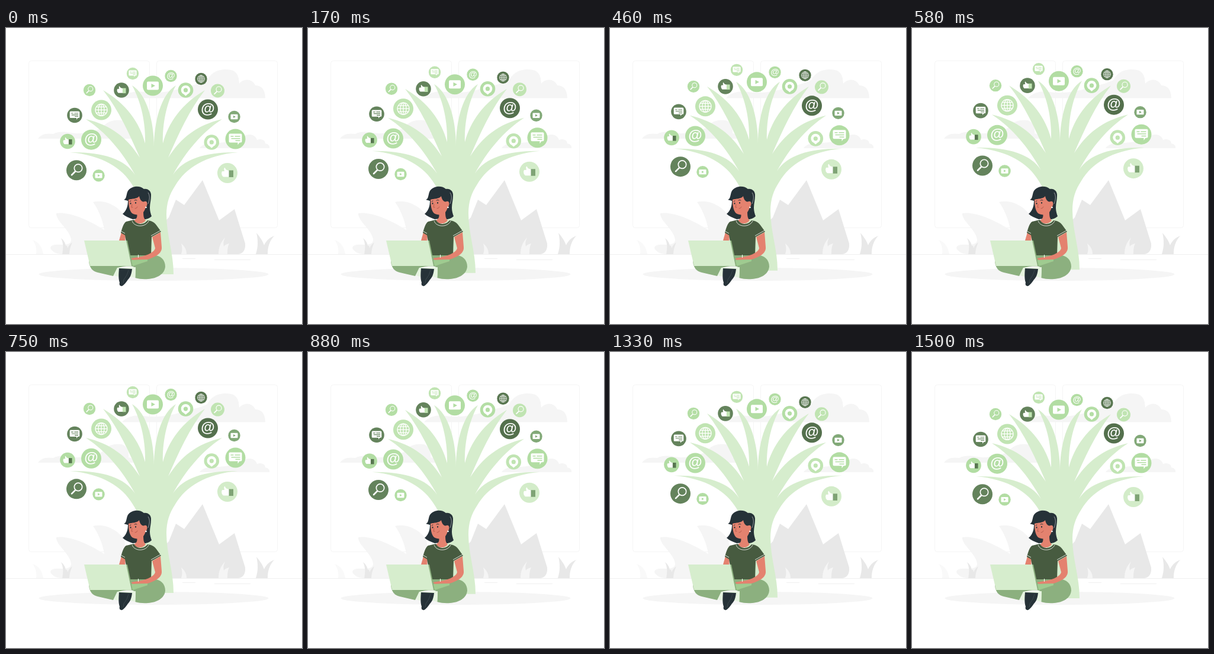
Recreate the animation shown at these times as an HTML page. Size 500 by 500 pixels, loop 1540 ms.

```html
<!DOCTYPE html>
<html lang="en">
<head>
<meta charset="utf-8">
<title>Tree of ideas</title>
<style>
  html, body { margin: 0; width: 100%; height: 100%; overflow: hidden; background: #fff; }
  svg { display: block; width: 100vw; height: 100vh; }
  text { font: bold 24px "Liberation Sans", Arial, sans-serif; text-anchor: middle; }
</style>
</head>
<body>
<svg viewBox="0 0 500 500">
  <g fill="none" stroke="#f5f5f5">
    <rect x="38.5" y="55.5" width="204" height="282" rx="4"/>
    <rect x="254.5" y="55.5" width="204" height="282" rx="4"/>
  </g>

  <g fill="#f5f5f5">
    <path d="M196 118.500C205 108 220 106 232 108C262 112 285 105 303 100C322 95 333 92 340 88C350 68 372 68 384 72C394 78 393 87 394 94C402 84 417 86 421 97C434 97 438 108 438 118.500Z"/>
    <path d="M54 187C58 180 68 177 80 179C92 172 110 178 120 178C136 178 150 174 162 169C170 157 185 154 196 156C206 160 208 170 207 178C214 179 216 183 216 187Z"/>
    <path d="M327 203C331 196 345 193 360 194C380 192 395 190 398 187C404 178 420 177 424 189C432 186 438 190 438 195C443 196 446 199 445 203Z"/>
    <path d="M85 313C100 310 130 318 166 341C163 322 155 305 147 294C165 289 190 300 200 318L210 382H95C85 382 78 378 75 372C75 366 84 365 95 366C114 366 112 357 105 345C97 333 84 322 85 313Z"/>
    <path d="M45 358C55 361 61 370 63 382H51C52 373 50 365 45 358Z" fill="#f9f9f9"/>
    <ellipse cx="249.500" cy="416" rx="194" ry="11"/>
  </g>
  <g fill="#e8e8e8">
    <path d="M265 330L275 320L287 290L301 299L332 257L360 325L386 306L404 364C405 375 400 382 391 382H265Z"/>
    <path d="M93 355C98 359 100 363 101 368C103 366 104 370 104 372C106 367 109 364 112 362C109 369 107 375 107 382H95C97 372 97 363 93 355Z"/>
    <path d="M423 346C428 352 433 358 436 367C440 358 446 354 453 351C445 360 442 370 442 382H422C426 370 426 358 423 346Z"/>
  </g>
  <g fill="#f5f5f5">
    <path d="M296 364C302 369 305 375 305 382H296C298 376 298 370 296 364Z"/>
    <path d="M370 354C367 360 367 365 368 369C370 366 373 365 377 364C374 370 374 376 374 382H359C359 370 363 361 370 354Z"/>
  </g>
  <path d="M0 382.500H500M298 389.500H320M352 391.500H413" stroke="#f0f0f0" fill="none"/>

  <g id="floating">
    <g fill="#d6edcd">
      <path id="half" d="M251 201H250C250 158 238 112 213 97C229 126 236 162 235 195C226 160 203 128 164 105C190 138 209 180 226 219C205 186 178 164 135 154C170 177 197 210 218 248C200 220 160 209 108 210C163 215 196 236 214 266C224 281 229 296 229 315C229 350 217 380 217 416H251Z"/>
      <use href="#half" transform="translate(500) scale(-1 1)"/>
    </g>
    <g id="icons"></g>
  </g>

  <g id="woman">
    <path d="M199 290C204 289 203 280 206 275C211 267 226 265 233 272C240 271 246 276 245 284C245 290 243 297 243 303C243 310 245 315 246 318C241 323 232 325 225 322L214 323C207 320 201 318 197 314C204 308 206 300 206 292C204 291 201 291 199 290Z" fill="#263238"/>
    <path d="M240 278C244 284 242 292 240 297" fill="none" stroke="#fff" stroke-width=".5"/>
    <g fill="#e4826f">
      <path d="M195 345L202 348L201 363L191 359Z"/>
      <path d="M221 311L232 307C232 316 232 321 236 325C231 332 220 332 216 325C222 322 222 318 221 311Z"/>
      <path d="M207 290C212 288 222 289 225 284C226 290 230 295 234 293C239 291 240 299 236 303C234 309 232 312 229 314C225 316 217 316 213 313C208 308 207 298 207 290Z"/>
    </g>
    <g fill="none" stroke="#263238" stroke-linecap="round">
      <path d="M209 293L211 292M217 291Q219 289.500 221 291" stroke-width=".9"/>
      <path d="M210.500 296v.8M219 295v.8" stroke-width="2"/>
      <path d="M213 298L212 303H214M218 305Q221 305 222 302" stroke="#a94f43" stroke-width=".7"/>
    </g>
    <circle cx="236.500" cy="303" r="1.300" fill="#fff"/>

    <g fill="#8cb07f">
      <path d="M140 394C141 405 146 411 155 413L181 419L188 405L214 400Z"/>
      <path d="M207 383H247C262 384 269 392 269 403C268 416 255 423 240 424C232 424.500 225 424 218 422L219 405L207 400Z"/>
    </g>
    <path d="M188 405L219 404L218.500 422L210 420L206 412H191L190 420L182 418Z" fill="#e6f4e0"/>
    <path d="M191 406L213 407C212 416 210 421 206 425C203 430 199 434 196 436C192 436 191 433 192 430C190 424 190 417 191 406Z" fill="#263238"/>
    <path d="M207 409Q205 418 199 425L198 431" fill="none" stroke="#4a565b" stroke-width=".6"/>

    <path d="M203 327L216 324C221 333 233 333 239 325C248 326 251 329 254 333L262 344L246 353L245 384H207L201 350L194 346C196 338 199 329 203 327Z" fill="#475b40"/>
    <path d="M213 326C217 337 236 337 241 326M245 351L261 342M195 343.500L201 347" fill="none" stroke="#fff" stroke-width=".8"/>
    <path d="M247 353L261 345L263 370C264 381 252 387 239 391L214 392L211 389L226 386.500C240 384 251 378 252 372Z" fill="#e4826f"/>
    <path d="M223.500 383V388" stroke="#fff"/>
    <path d="M210 392L239 391V394L213 402.500Z" fill="#9fcb90"/>
    <path d="M202 359H205L214 402.500H142V400H210Z" fill="#8cb07f"/>
    <path d="M132 359H203L212 402H142Z" fill="#d6edcd"/>
  </g>
</svg>
<script>
// Each glyph is drawn for a disc of radius 17 centred on the origin.
const glyphs = {
  chat: c => `<path d="M-9-9H9Q11-9 11-7V4Q11 6 9 6H7L4 10V6H-9Q-11 6-11 4V-7Q-11-9-9-9Z" fill="#fff"/>
    <path d="M-8-4.500H-3M-1-4.500H8M-7-.8H8M0 2.800H8" stroke="${c}" stroke-width="1.500"/>`,
  play: c => `<rect x="-10" y="-7" width="20" height="14" rx="2" fill="#fff"/><path d="M-2.500-3.500L4 0L-2.500 3.500Z" fill="${c}"/>`,
  search: () => `<g fill="none" stroke="#fff" stroke-linecap="round"><circle cx="3" cy="-3.500" r="6.700" stroke-width="1.700"/>
    <path d="M-2 2L-8 8" stroke-width="2.600"/></g>`,
  globe: () => `<g fill="none" stroke="#fff" stroke-width="1.300"><circle r="10"/><ellipse rx="5" ry="10"/>
    <path d="M0-10V10M-10 0H10M-8.500-5H8.500M-8.500 5H8.500"/></g>`,
  pin: c => `<path d="M0 13L-4 9.500A10.500 10.500 0 1 1 4 9.500Z" fill="#fff"/><circle r="4.800" fill="${c}"/>`,
  at: () => `<text y="6.300" fill="#fff">@</text>`,
  thumb: (c, cuff) => `<path d="M3-4L-1-5C-3-6-4-8-4-9C-6-9-6-7-5-3H-8Q-10-3-9.500-1Q-10.500 0-9.500 2Q-10 3.500-8.500 4.500Q-8.500 6.500-6 6.500H3Z" fill="#fff"/>
    <rect x="2.500" y="-4.500" width="7.500" height="11.500" fill="${cuff}"/>`
};

const icons = [
  ['chat', 214, 77, 10.2, '#c0e4b2'],
  ['at', 278.5, 81, 10.2, '#b2dda3'],
  ['play', 248, 97.5, 17, '#b2dda3'],
  ['globe', 329.5, 86, 10.2, '#587650'],
  ['thumb', 195, 105, 12.8, '#64835c', '#c0e4b2'],
  ['search', 141, 105, 10.2, '#b4dea5'],
  ['pin', 303.5, 105, 12.8, '#b4dea5'],
  ['search', 357.5, 106, 11.5, '#c0e4b2'],
  ['globe', 161, 138.5, 17, '#c0e4b2'],
  ['chat', 116, 147.5, 12.8, '#64835c'],
  ['at', 341, 137.5, 17, '#54704d'],
  ['play', 385.5, 150, 10.2, '#82a978'],
  ['thumb', 104, 191.5, 12.8, '#b2dda3', '#587650'],
  ['at', 144, 188.7, 17, '#b4dea5'],
  ['pin', 347.3, 193, 12.8, '#c0e4b2'],
  ['chat', 387.5, 187.5, 17, '#b2dda3'],
  ['search', 119, 240.3, 17, '#64835c'],
  ['play', 156.5, 249.3, 10.2, '#b2dda3'],
  ['thumb', 374, 245, 17, '#d3ecc9', '#7fa375']
];

document.getElementById('icons').innerHTML = icons.map(([kind, x, y, r, color, cuff]) =>
  `<g transform="translate(${x} ${y}) scale(${r / 17})"><circle r="17" fill="${color}"/>${glyphs[kind](color, cuff)}</g>`
).join('');

const LOOP = 1540, PERIOD = 1500, RISE = 10, FPS = 24, REST = 0.5;
const floating = document.getElementById('floating');
const start = performance.now();

// Linear rise and fall, stepped at 24 pictures per second.
function draw(now) {
  const time = Math.max(0, now - start) % LOOP;
  const step = Math.floor((time + 5) * FPS / 1000) + 1;
  const phase = (step * 1000 / FPS % PERIOD) / PERIOD;
  const lift = RISE * (1 - Math.abs(1 - 2 * phase));
  floating.setAttribute('transform', `translate(0 ${REST - lift})`);
  requestAnimationFrame(draw);
}
draw(start);
</script>
</body>
</html>
```
